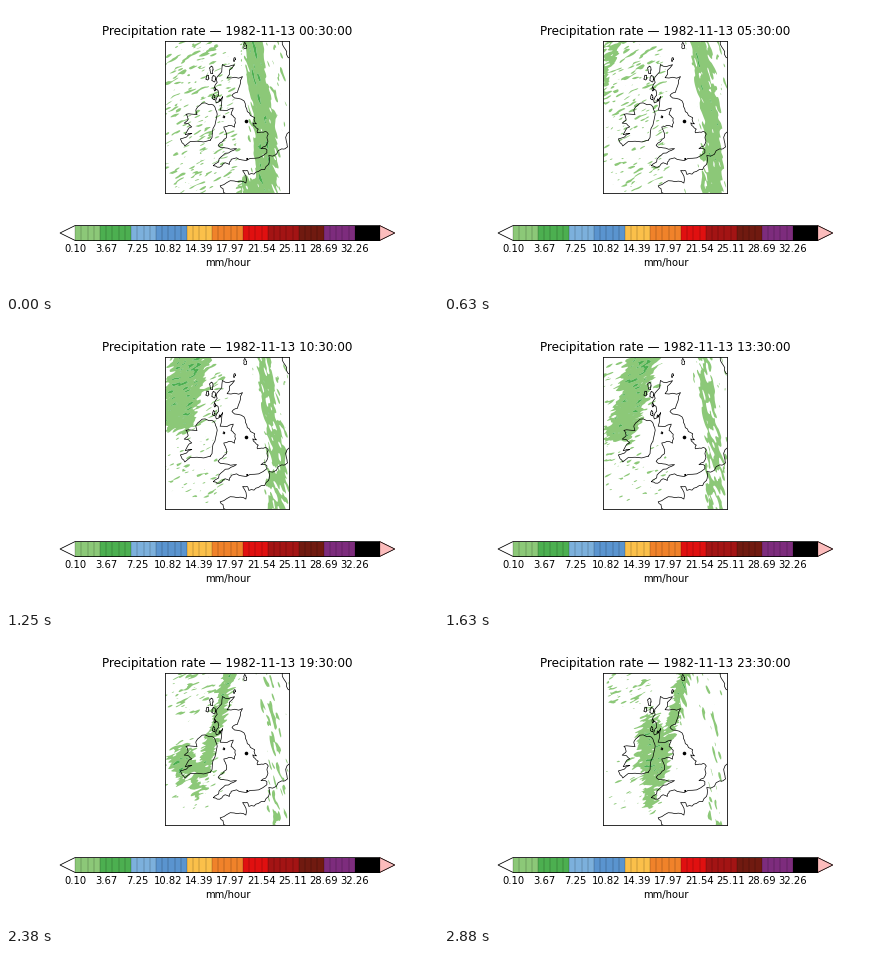
These frames come from a looping animation (432 by 288 pixels, 3.01 s). A matplotlib script:

```python
import numpy as np
import matplotlib.pyplot as plt
from matplotlib.animation import FuncAnimation
from matplotlib.cm import ScalarMappable
from matplotlib.colors import BoundaryNorm, ListedColormap

W, H = 432, 288
HOURS, HOUR_MS = 24, 125
TICK_MS, LOOP_MS = 14, 3010
LEFT, RIGHT, TOP, BOTTOM = 159.4, 283.4, 35.3, 187.3  # map frame in stage pixels

RAIN = ["#8cc878", "#4caf50", "#7cb0dc", "#5a94cf", "#fbc04a", "#f0822a",
        "#e01010", "#a31414", "#701a10", "#7d2c7d", "#000000"]

plt.rcParams["font.family"] = "DejaVu Sans"
rng = np.random.default_rng(12)

# Headlands and bays (longitude, latitude); finer wiggles are seeded.
BRITAIN = [(-5.7, 50.07), (-5.2, 49.96), (-4.2, 50.35), (-3.65, 50.2), (-3.4, 50.65),
           (-2, 50.6), (0.25, 50.74), (1.35, 51.13), (1.4, 51.37), (0.6, 51.5),
           (1.6, 52.1), (1.7, 52.7), (1.3, 52.93), (0.2, 52.85), (0.35, 53.15),
           (-0.4, 53.7), (0.1, 53.6), (-0.1, 54.12), (-1.15, 54.65), (-1.6, 55.55),
           (-3.4, 56), (-2.6, 56.27), (-2.1, 57.1), (-1.8, 57.6), (-4.2, 57.5),
           (-3.05, 58.6), (-5, 58.6), (-5.8, 57.5), (-6.1, 56.7), (-5.4, 56),
           (-5.7, 55.35), (-4.8, 55.9), (-5.1, 54.75), (-3.2, 54.95), (-3.5, 54.4),
           (-2.9, 54.1), (-3, 53.35), (-4.5, 53.35), (-4.1, 52.8), (-4.1, 52.45),
           (-5.2, 51.8), (-4.3, 51.6), (-2.7, 51.55), (-4.2, 51.15), (-5.05, 50.4)]
IRELAND = [(-6.3, 52.2), (-6, 53.2), (-5.5, 54.4), (-6.1, 55.15), (-7.35, 55.3),
           (-8.6, 54.7), (-8.4, 54.27), (-10, 54.2), (-9.6, 53.8), (-10.1, 53.45),
           (-9, 53.2), (-9.8, 52.5), (-8.9, 52.65), (-10.4, 52.1), (-9.7, 51.55)]
CONTINENT = [(4.9, 53.1), (4.1, 52), (4.2, 51.5), (3.4, 51.38), (1.6, 50.9),
             (1.5, 50.15), (0.15, 49.6), (-1.1, 49.37), (-1.25, 49.68), (-1.9, 49.7),
             (-1.5, 48.65), (-3, 48.83), (-4.75, 48.4), (-4.3, 47.85), (-2.8, 47.5)]
NORWAY = [(5.2, 60.8), (5.1, 59.9), (5.6, 59), (6.5, 58.1)]
# Islands: centre and radius in degrees
ISLES = [(-6.7, 58.1, 0.38), (-7.3, 57.4, 0.26), (-6.3, 57.35, 0.28), (-6, 56.45, 0.18),
         (-6.1, 55.8, 0.22), (-5.2, 55.6, 0.12), (-3.1, 59.05, 0.17), (-1.3, 60.2, 0.28),
         (-4.55, 54.2, 0.13), (-1.3, 50.68, 0.09)]


def project(points):
    """Rotated-pole projection straight to stage pixels."""
    lon, lat = np.radians(np.array(points, float).T)
    dl, c = lon + np.radians(2.5), np.radians(52.5)
    east = np.cos(lat) * np.sin(dl)
    ahead = np.cos(lat) * np.cos(dl) * np.cos(c) + np.sin(lat) * np.sin(c)
    up = np.sin(lat) * np.cos(c) - np.cos(lat) * np.cos(dl) * np.sin(c)
    return np.column_stack([232 + 11.9 * np.degrees(np.arctan2(east, ahead)),
                            131.3 - 11.9 * np.degrees(np.arcsin(up))])


def roughen(line, rounds=2, amount=0.11):
    """Push segment midpoints sideways to get a ragged shore."""
    for _ in range(rounds):
        step = np.diff(line, axis=0)
        normal = np.column_stack([-step[:, 1], step[:, 0]])
        push = amount * rng.normal(size=(len(step), 1)).clip(-1.5, 1.5)
        mid = line[:-1] + step / 2 + normal * push
        line = np.insert(line, np.arange(1, len(line)), mid, axis=0)
    return line


def island(lon, lat, size):
    a = np.linspace(0, 2 * np.pi, 8)
    r = size * rng.uniform(0.5, 1.2, len(a))
    r[-1] = r[0]
    return np.column_stack([lon + r * np.cos(a), lat + r * np.sin(a)])


# ---- rain ----
X, Y = np.meshgrid(np.arange(LEFT, RIGHT + 0.5, 0.5), np.arange(TOP, BOTTOM + 0.5, 0.5))
ROWS, COLS = X.shape
DOWN = (Y - TOP) / (BOTTOM - TOP)


def streaks(angle, length, width, n=512):
    """Periodic unit-variance noise stretched along a direction."""
    f = np.fft.fftfreq(n) * 2 * np.pi
    fx, fy = np.meshgrid(f, f)
    c, s = np.cos(np.radians(angle)), np.sin(np.radians(angle))
    blur = np.exp(-(((fx * c + fy * s) * length) ** 2 + ((fx * s - fy * c) * width) ** 2) / 2)
    noise = np.fft.ifft2(np.fft.fft2(rng.normal(size=(n, n))) * blur).real
    return noise / noise.std()


SHOWERS = streaks(-25, 4.2, 1.1)
FRONTAL = streaks(72, 6, 1.4)


def drift(noise, dx, dy):
    return np.roll(noise, (dy, dx), (0, 1))[:ROWS, :COLS]


def ease(t):
    t = np.clip(t, 0, 1)
    return t * t * (3 - 2 * t)


def band(center, half, peak):
    return np.minimum(peak, 0.4 * (half - np.abs(X - center)))


def cell(cx, cy, rx, ry, peak):
    r = np.hypot((X - cx) / rx, (Y - cy) / ry)
    return np.minimum(peak, 0.4 * (1 - r) * min(rx, ry))


def rain(h):
    # Front in the east: slows down, narrows and fades
    front = band(246 + 14 * DOWN + 4 * np.sin(np.pi * DOWN) + 12 * (1 - np.exp(-h / 3)),
                 10.5 - 0.3 * h, 2.4 - 0.16 * h)
    tail = cell(246 + 3 * h, 181, 15, 10, 1 - 0.9 * h)
    core = cell(258 + 2 * h, 164 + 4 * h, 5, 16, 3.6 - 0.6 * h)

    # Second band from the north-west: its southern end advances with it
    second = band(186 + 4.25 * (h - 10) - 0.28 * (Y - TOP),
                  6 + 13 * np.exp(-((h - 10) / 5) ** 2), min(2.6, 0.7 * (h - 4.5)))
    second = np.minimum(second, 0.3 * (110 + 3.5 * (h - 10) - Y))

    # Rain over Ireland: grows, then crosses the sea
    grow, cross = ease((h - 15) / 4), ease((h - 19) / 4)
    ireland = cell(171 + 6 * grow + 32 * cross, 124 - 11 * cross,
                   5 + 8 * grow + 3 * cross, 10 + 8 * grow + 19 * cross, -3 + 5.2 * grow)
    south = cell(192 + 14 * cross, 146 + 13 * cross, 4 + 3 * grow, 12, -3 + 3.8 * grow)

    # Scattered showers
    north_west = cell(191 - 0.3 * h, 82 - 1.3 * h, 34 - 0.6 * h, 46 - 1.4 * h, -1)
    south_west = cell(194 - 0.3 * h, 146, 34 - 0.4 * h, 40 - 0.9 * h, -1.2 - 0.03 * h)
    east = cell(271 + 0.3 * h, 100, 5, 38, -1.1 - 0.04 * h)

    shape = np.maximum.reduce([front, tail, core, second, ireland, south,
                               north_west, south_west, east])
    return shape + np.where(X > 236, drift(FRONTAL, 2 * h, 4 * h), drift(SHOWERS, 8 * h, -2 * h))


# ---- map ----
fig = plt.figure(figsize=(W / 72, H / 72), dpi=72, facecolor="white")
ax = fig.add_axes([LEFT / W, 1 - BOTTOM / H, (RIGHT - LEFT) / W, (BOTTOM - TOP) / H])
ax.set(xlim=(LEFT, RIGHT), ylim=(BOTTOM, TOP), xticks=[], yticks=[])
title = ax.set_title("", fontsize=12)

shores = [BRITAIN + BRITAIN[:1], IRELAND + IRELAND[:1], CONTINENT, NORWAY]
shores += [island(*isle) for isle in ISLES]
for shore in shores:
    ax.plot(*roughen(project(shore)).T, color="black", lw=0.7, zorder=3)
ax.plot(240.3, 115.3, "o", color="black", ms=3.6, mew=0, zorder=4)

layers = [ax.contourf(X, Y, rain(h), levels=[0, 3.6, 20], colors=RAIN[:2],
                      antialiased=True, zorder=1) for h in range(HOURS)]

# ---- colour bar ----
levels = 0.1 + 0.71467 * np.arange(50)
cmap = ListedColormap([RAIN[int((i + 0.5) * 11 / 49)] for i in range(49)])
cmap.set_under("white")
cmap.set_over("#fcbcbc")
cax = fig.add_axes([54 / W, 1 - 234.5 / H, 334.8 / W, 15 / H])
bar = fig.colorbar(ScalarMappable(BoundaryNorm(levels, 49), cmap), cax=cax,
                   orientation="horizontal", extend="both", drawedges=True,
                   ticks=levels[:46:5], format="%.2f")
bar.minorticks_off()
bar.dividers.set_alpha(0.5)
bar.ax.tick_params(length=0, labelsize=10)
bar.set_label("mm/hour", fontsize=10)


def draw(tick):
    # The hour in force by the end of this tick
    hour = min(HOURS - 1, ((tick + 1) * TICK_MS - 1) // HOUR_MS)
    for h, layer in enumerate(layers):
        layer.set_visible(h == hour)
    title.set_text(f"Precipitation rate — 1982-11-13 {hour:02d}:30:00")
    return []


anim = FuncAnimation(fig, draw, frames=LOOP_MS // TICK_MS, init_func=lambda: [],
                     interval=TICK_MS, repeat=True, repeat_delay=0)
plt.show()
```
